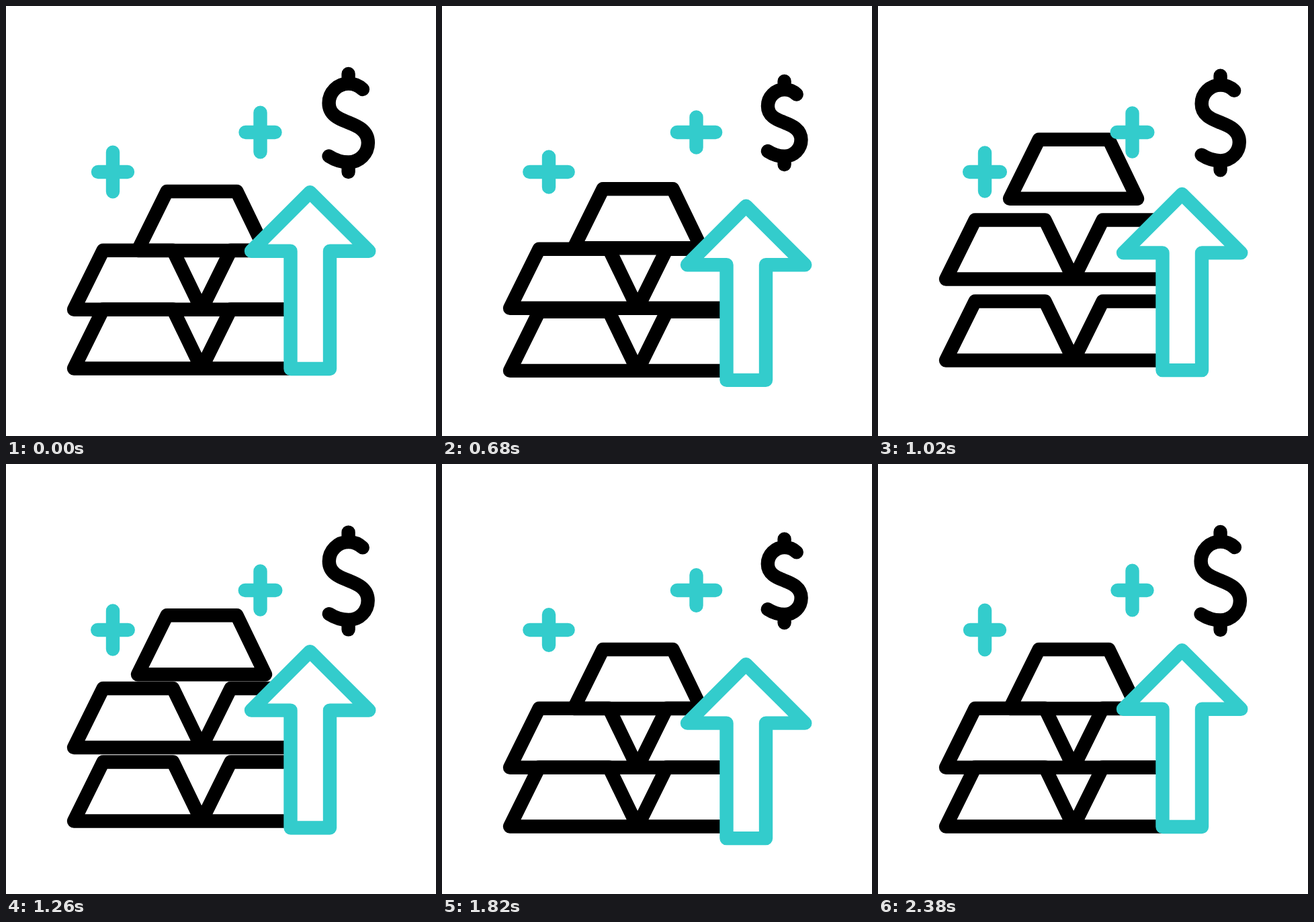
Recreate the animation shown at these times as an HTML page. Size 640x640 px, loop 2.4 s.

```html
<!DOCTYPE html>
<html>
<head>
<meta charset="utf-8">
<style>
  html, body { margin: 0; width: 100%; height: 100%; overflow: hidden; background: #fff; }
  svg { display: block; width: 100vw; height: 100vh; }
  path { fill: none; stroke: #000; stroke-width: 20.4; stroke-linecap: round; stroke-linejoin: round; }
  .teal { stroke: #3cc; }
  #arrow { fill: #fff; }
  #dollar { vector-effect: non-scaling-stroke; }
</style>
</head>
<body>
<svg viewBox="0 0 640 640">
  <path id="row0"/>
  <path id="row1"/>
  <path id="row2"/>
  <path id="arrow" class="teal"/>
  <path id="plus0" class="teal"/>
  <path id="plus1" class="teal"/>
  <path id="dollar" d="M0-73V-58.5M21.3-50C15.5-55.5 8-58.5 .3-58.5C-16-58.5-29-45.5-29-29.5C-29-10-9.5-4.5 .3-.5S29.3 10 29.3 29.5C29.3 45.5 16.5 58.5 .3 58.5C-11.5 58.5-20.5 55-29 49.5M0 58.5V73"/>
</svg>
<script>
const LOOP = 2400;
const part = id => document.getElementById(id);
const draw = (id, d) => part(id).setAttribute('d', d);

// Eased value at time t from [time, value] keys
function ease(t, keys) {
  if (t <= keys[0][0]) return keys[0][1];
  for (let i = 1; i < keys.length; i++) {
    const [t0, a] = keys[i - 1], [t1, b] = keys[i];
    if (t < t1) {
      const s = (t - t0) / (t1 - t0);
      return a + (b - a) * s * s * (3 - 2 * s);
    }
  }
  return keys[keys.length - 1][1];
}

// Two swings between 0 and 1
const swing = (t, ...times) => ease(t, times.map((time, i) => [time, i % 2]));

const bar = (x, y) => `M${x} ${y}l43.5-88h104l42.5 88z`;

const rows = [
  { x: [196], y: 364, dip: 565, lift: -80.4 },
  { x: [101, 291], y: 451.7, dip: 535, lift: -47 },
  { x: [101, 291], y: 539.5, dip: 512, lift: -12.6 }
];
const pluses = [[159, 247], [378.5, 188]];

function render(t) {
  rows.forEach(({ x, y, dip, lift }, i) => {
    const dy = ease(t, [[0, 0], [dip, 7.7], [1080, lift], [1520, 0]]);
    draw('row' + i, x.map(left => bar(left, y + dy)).join(''));
  });

  const drop = swing(t, 0, 640, 1130, 1840, 2380);
  const head = 364.7 + 21 * drop, base = 540 + 17.2 * drop;
  draw('arrow', `M452.5 ${head - 87.5}L540.3 ${head}H482V${base}H423.5V${head}H365z`);

  const shift = 6.8 * swing(t, 0, 640, 1130, 1760, 2370);
  const w = 22 + shift, h = 29.3 - shift;
  pluses.forEach(([x, y], i) =>
    draw('plus' + i, `M${x - w} ${y}h${2 * w}M${x} ${y - h}v${2 * h}`));

  const scale = 1 - 0.15 * swing(t, 180, 690, 1180, 1760, 2380);
  part('dollar').setAttribute('transform', `translate(509.6 174) scale(${scale})`);
}

function tick() {
  render(performance.now() % LOOP);
  requestAnimationFrame(tick);
}
tick();
</script>
</body>
</html>
```
